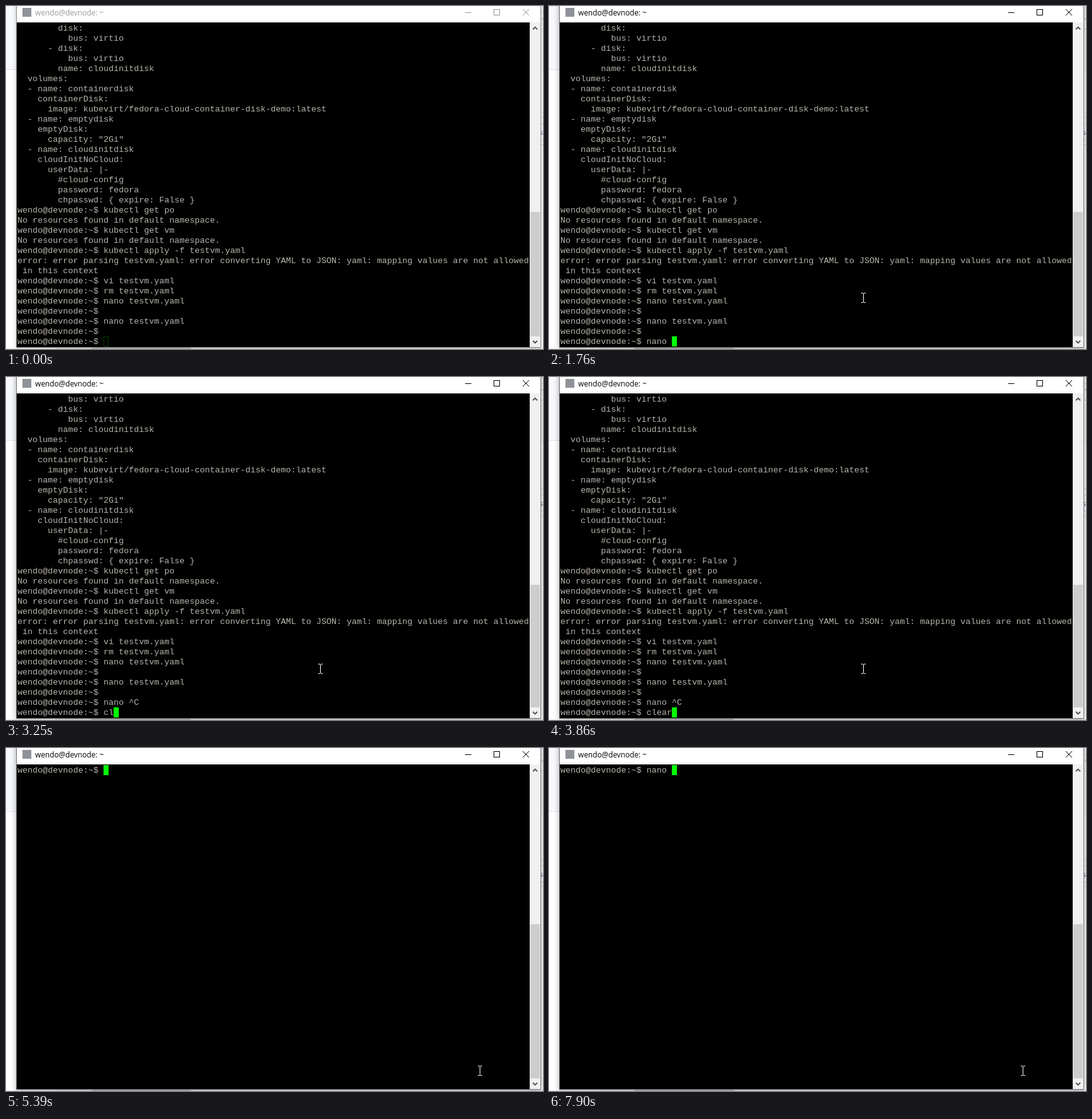
Recreate the animation shown at these times as an HTML page. Size 848 by 543 pixels, loop 8 s.

```html
<!DOCTYPE html>
<html lang="en">
<head>
<meta charset="utf-8">
<title>Terminal session</title>
<style>
  html, body { margin: 0; width: 100%; height: 100%; overflow: hidden; background: #fff; }
  #stage { position: relative; width: 848px; height: 543px; overflow: hidden; }
  #stage > *, #win > * { position: absolute; }
  svg { left: 0; top: 0; display: block; }
  #win {
    left: 16px; top: -10px; width: 829px; height: 551px; background: #707070;
    box-shadow: 0 1px 9px rgba(0, 0, 0, .32);
  }
  #win.idle { box-shadow: 0 1px 7px rgba(0, 0, 0, .22); background: #8a8a8a; }
  #bar { left: 1px; top: 0; width: 827px; height: 36px; background: #fff; }
  #term { left: 1px; top: 36px; width: 810px; height: 514px; background: #000; }
  #track { left: 811px; top: 36px; width: 17px; height: 514px; background: #f0f0f0; }
  #title {
    left: 46px; top: 2px; color: #000; white-space: pre;
    font: 11.75px/17px "Open Sans", "Noto Sans", sans-serif;
  }
  #buttons { color: #000; }
  .idle ~ #title, .idle ~ #buttons { color: #999; }
  #thumb { left: 828px; width: 15px; background: #cdcdcd; }
  #caret { width: 8px; height: 16px; background: #0f0; box-sizing: border-box; }
  .idle ~ #caret { background: none; border: 1px solid #003f00; }
  #text {
    left: 18px; top: 28px; margin: 0; color: #b9b4ac; white-space: pre;
    font: 13.33px/16px "Liberation Mono", "Courier New", monospace;
  }
  #click { left: 482px; top: 449px; width: 24px; height: 24px; border-radius: 50%; background: rgba(255, 255, 0, .47); }
  #pointer { mix-blend-mode: difference; }
</style>
</head>
<body>
<div id="stage">
  <svg width="848" height="543" shape-rendering="crispEdges">
    <path fill="#f8f9fd" d="M0 0H848V100H0z"/>
    <path fill="#e1e2ec" d="M0 100H848V101H0z"/>
    <path fill="#f4f4f4" d="M0 541H78V543H0z"/>
    <path fill="#e6e6e6" d="M78 541H848V543H78z"/>
    <path fill="#bdbdbd" d="M135 541H292V543H135z"/>
    <path fill="#d4d6dc" d="M840 10h8v1h-8zM840 36h8v1h-8zM840 176h8v1h-8zM840 186h8v1h-8zM840 212h8v1h-8zM840 219h8v1h-8z"/>
    <text x="845" y="27" font-family="Open Sans, sans-serif" font-size="11" fill="#777">1</text>
    <text x="842.5" y="204" font-family="Open Sans, sans-serif" font-size="11" fill="#234f80">s</text>
  </svg>

  <div id="win"><div id="bar"></div><div id="term"></div><div id="track"></div></div>
  <div id="title"></div>
  <svg id="buttons" width="848" height="543" fill="none" stroke="currentColor">
    <path d="M725 10.5h10M770.5 5.5h9v9h-9z" shape-rendering="crispEdges"/>
    <path d="M816 5l10 10M826 5l-10 10"/>
    <path d="M832 37l3.5-3.5 3.5 3.5M832 530l3.5 3.5 3.5-3.5" stroke="#505050" stroke-width="1.8"/>
    <rect x="26" y="3" width="14" height="14" fill="#8f9299" stroke="none"/>
  </svg>
  <div id="thumb"></div>
  <div id="caret"></div>
  <pre id="text"></pre>
  <div id="click"></div>
  <svg id="pointer" width="7" height="16" fill="#fff" shape-rendering="crispEdges">
    <path d="M0 0h3v1h-3zM4 0h3v1h-3zM3 1h1v14h-1zM0 15h3v1h-3zM4 15h3v1h-3z"/>
  </svg>
</div>

<script>
const LOOP = 8000, ROWS = 32, CELL_W = 8, CELL_H = 16, LEFT = 18, TOP = 27;
const FOCUS_AT = 670, CLICK_END = 820;
const HOST = 'wendo@devnode';
const PROMPT = HOST + ':~$ ';
const $ = id => document.getElementById(id);

const history = `        disk:
          bus: virtio
      - disk:
          bus: virtio
        name: cloudinitdisk
  volumes:
  - name: containerdisk
    containerDisk:
      image: kubevirt/fedora-cloud-container-disk-demo:latest
  - name: emptydisk
    emptyDisk:
      capacity: "2Gi"
  - name: cloudinitdisk
    cloudInitNoCloud:
      userData: |-
        #cloud-config
        password: fedora
        chpasswd: { expire: False }
$ kubectl get po
No resources found in default namespace.
$ kubectl get vm
No resources found in default namespace.
$ kubectl apply -f testvm.yaml
error: error parsing testvm.yaml: error converting YAML to JSON: yaml: mapping values are not allowed
 in this context
$ vi testvm.yaml
$ rm testvm.yaml
$ nano testvm.yaml
$ 
$ nano testvm.yaml
$ `.split('\n').map(line => line.replace(/^\$ /, PROMPT));

// Lines above the prompt and the scroll thumb's top edge
const screens = {
  start: { lines: history, thumb: 326 },
  broken: { lines: [...history, PROMPT + 'nano ^C'], thumb: 329 },
  cleared: { lines: [], thumb: 279 }
};

// time, screen, typed command
const typing = [
  [0, 'start', ''], [1450, 'start', 'n'], [1530, 'start', 'na'],
  [1680, 'start', 'nano'], [1760, 'start', 'nano '],
  [2460, 'broken', ''], [3110, 'broken', 'c'], [3250, 'broken', 'cl'],
  [3400, 'broken', 'cle'], [3630, 'broken', 'clea'], [3860, 'broken', 'clear'],
  [4020, 'cleared', ''], [5860, 'cleared', 'n'], [6340, 'cleared', 'na'],
  [6490, 'cleared', 'nan'], [6950, 'cleared', 'nano'], [7350, 'cleared', 'nano '],
  [7670, 'cleared', 'nano'], [7900, 'cleared', 'nano ']
];

// time, left, top; off stage while x is beyond the right edge
const moves = [
  [0, 900, 330], [440, 836, 350], [520, 690, 405], [590, 560, 442], [670, 493, 454],
  [4690, 803, 463], [4760, 900, 480],
  [5090, 838, 507], [5165, 815, 504], [5240, 785, 500], [5315, 758, 501], [5390, 745, 503]
];

const stepAt = (steps, t) => steps.findLast(step => step[0] <= t);

function place(el, x, y) {
  el.style.left = x + 'px';
  el.style.top = y + 'px';
}

let shown;
function showText(step) {
  if (step === shown) return;
  shown = step;
  const [, name, typed] = step;
  const { lines, thumb } = screens[name];
  const rows = [...lines, PROMPT + typed].slice(-ROWS);
  $('text').textContent = rows.join('\n');
  place($('caret'), LEFT + CELL_W * (PROMPT + typed).length, TOP + CELL_H * (rows.length - 1));
  $('thumb').style.top = thumb + 'px';
  $('thumb').style.height = 523 - thumb + 'px';
}

function draw() {
  const t = performance.now() % LOOP;
  showText(stepAt(typing, t));
  const [, x, y] = stepAt(moves, t);
  place($('pointer'), x, y);
  $('win').classList.toggle('idle', t < FOCUS_AT);
  $('click').hidden = t < FOCUS_AT || t >= CLICK_END;
  requestAnimationFrame(draw);
}

$('title').textContent = HOST + ': ~';
draw();
</script>
</body>
</html>
```
